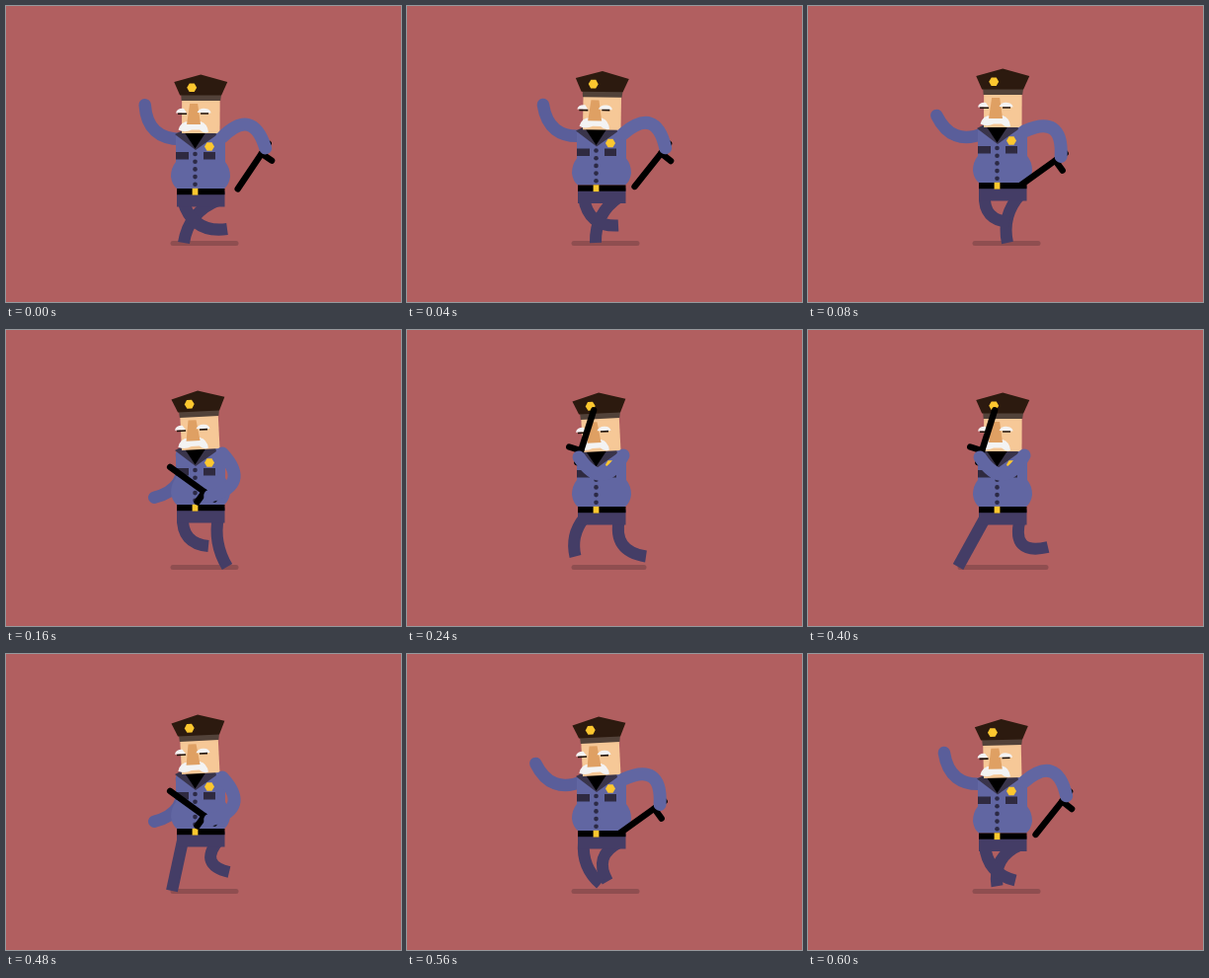
An HTML page with a canvas that plays this animation: 400x300 px, repeating every 640 ms.

```html
<!DOCTYPE html>
<html lang="en">
<head>
<meta charset="utf-8">
<title>Dancing officer</title>
<style>
html, body { margin: 0; width: 100%; height: 100%; overflow: hidden; background: #b15f60; }
canvas { display: block; width: 400px; height: 300px; }
</style>
</head>
<body>
<canvas id="stage" width="400" height="300"></canvas>
<script>
const ctx = document.getElementById('stage').getContext('2d');
const LOOP = 640, STEP = 40, RAD = Math.PI / 180;
const BLUE = '#6166a2', BACK_BLUE = '#5a5e9a', TROUSERS = '#443d66';
const DARK = '#2f2a40', GOLD = '#fdc72f', WHITE = '#f3f3f3';

// Steps of each foot: time, x, y, knee bend
const leftSteps = [
  [0, 224, 226, -23], [80, 204, 219, -19], [160, 205, 219, -19],
  [320, 136, 240, 0], [480, 168, 240, 0], [LOOP, 224, 226, -23]
];
const rightSteps = [
  [0, 180, 240, -16], [160, 224, 240, -10], [320, 260, 219, -40],
  [480, 226, 221, -27], [LOOP, 180, 240, -16]
];

function footAt(steps, t) {
  const i = steps.findIndex(s => s[0] > t);
  const a = steps[i - 1], b = steps[i];
  const f = (t - a[0]) / (b[0] - a[0]);
  return a.slice(1).map((v, n) => v + f * (b[n + 1] - v));
}

function poly(color, ...pts) {
  ctx.fillStyle = color;
  ctx.beginPath();
  for (let i = 0; i < pts.length; i += 2) ctx.lineTo(pts[i], pts[i + 1]);
  ctx.fill();
}

function shape(color, d) {
  ctx.fillStyle = color;
  ctx.fill(new Path2D(d));
}

function rect(color, x, y, w, h) {
  ctx.fillStyle = color;
  ctx.fillRect(x, y, w, h);
}

// A stroke bowed sideways by `bend`
function limb(color, width, cap, x0, y0, x1, y1, bend = 0) {
  const dx = x1 - x0, dy = y1 - y0, k = bend / Math.hypot(dx, dy);
  ctx.strokeStyle = color;
  ctx.lineWidth = width;
  ctx.lineCap = cap;
  ctx.beginPath();
  ctx.moveTo(x0, y0);
  ctx.quadraticCurveTo((x0 + x1) / 2 + dy * k, (y0 + y1) / 2 - dx * k, x1, y1);
  ctx.stroke();
}

function turned(x, y, degrees, paint) {
  ctx.save();
  ctx.translate(x, y);
  ctx.rotate(degrees * RAD);
  paint();
  ctx.restore();
}

function badge(x, y) {
  const pts = [];
  for (let a = 0; a < 360; a += 60) {
    pts.push(x + 5 * Math.cos(a * RAD), y + 5 * Math.sin(a * RAD));
  }
  poly(GOLD, ...pts);
}

// Torso, measured from the belt
function drawTorso() {
  rect(TROUSERS, 173, 0, 48.5, 15.5);
  shape(BLUE, 'M172 -56 L180 -62 H213 L222 -57 V-30 Q227 -24 227 -15 Q226 -7 221 -3 H173 Q168 -7 167 -15 Q167 -24 172 -30Z');
  poly('#39344a', 171, -58, 179, -62, 212, -61, 213, -57, 192, -42);
  poly('#000', 180, -61, 203, -61, 191.5, -43.5);
  rect(DARK, 172, -40, 13, 7.5);
  rect(DARK, 200, -40, 12, 7.5);
  ctx.fillStyle = '#2c2a45';
  for (let i = 0; i < 5; i++) {
    ctx.beginPath();
    ctx.arc(191.5, -38 + i * 7.7, 2.3, 0, 7);
    ctx.fill();
  }
  badge(206, -45.5);
  rect('#000', 173, -3, 48.5, 6.2);
  rect(GOLD, 188.6, -3.2, 5.8, 6.8);
}

// Head, measured from the chin
function drawHead() {
  ctx.translate(-197, -123);
  rect('#f6c897', 178, 88, 38.5, 35);
  shape(WHITE, 'M174.5 119.5 Q177 111 185 111 H197 Q204 113 205 122 Q200 123.5 196 119.5 H188 Q181 123 174.5 119.5Z');
  poly('#dfa063', 186, 93, 194, 93, 197, 114, 183, 114);
  shape(WHITE, 'M172 102.5 Q173 97.5 180 98 L183 102.5Z M193.5 102 Q196 97 202 98 Q207 98.5 207.5 102.5Z');
  limb('#1c120c', 1.6, 'butt', 174, 103.3, 183, 103.3);
  limb('#1c120c', 1.6, 'butt', 197, 103, 205, 103);
  poly('#524239', 177, 83, 218, 83, 217, 90, 177.5, 90);
  poly('#2c1a0f', 170, 71, 197, 63.5, 224, 71, 218, 84.5, 176, 84.5);
  badge(188, 76.8);
}

function drawBaton() {
  limb('#000', 6.4, 'round', -5.5, 0, 50, 0);
  limb('#000', 6.4, 'round', 7, 0, 7, -12.5);
}

// The arm swings round its shoulder; returns the hand
function handAt(x, y, reach, degrees) {
  return [x + reach * Math.cos(degrees * RAD), y + reach * Math.sin(degrees * RAD)];
}

function draw(now) {
  const t = Math.floor(now % LOOP / STEP) * STEP;
  const phase = 2 * Math.PI * t / LOOP, c = Math.cos(phase);
  const swing = c * (1.2 - .2 * c * c);
  const belt = 180 + 8 * (t % 320 / 160 - 1) ** 2;
  const left = footAt(leftSteps, t), right = footAt(rightSteps, t);

  rect('#b15f60', 0, 0, 400, 300);
  limb('#8f4e50', 5, 'round', Math.min(169, left[0] + 2), 240.5, Math.max(233, right[0] - 2), 240.5);
  limb(TROUSERS, 12, 'butt', 215, belt + 9, ...right);
  limb(TROUSERS, 12, 'butt', 179, belt + 9, ...left);

  ctx.save();
  ctx.translate(0, belt);
  limb(BACK_BLUE, 12.5, 'round', 178, -53, ...handAt(178, -53, 51, 123 + 100 * swing), 24);
  drawTorso();
  turned(197, -59, -1.3 + 2.2 * Math.cos(2 * phase - Math.PI / 4), drawHead);
  const angle = 106 - 92 * swing;
  const hand = handAt(219, -55, 45, angle);
  turned(...hand, angle + 110, drawBaton);
  limb(BLUE, 13, 'round', 219, -55, ...hand, 37);
  ctx.restore();

  requestAnimationFrame(draw);
}
draw(0);
</script>
</body>
</html>
```
